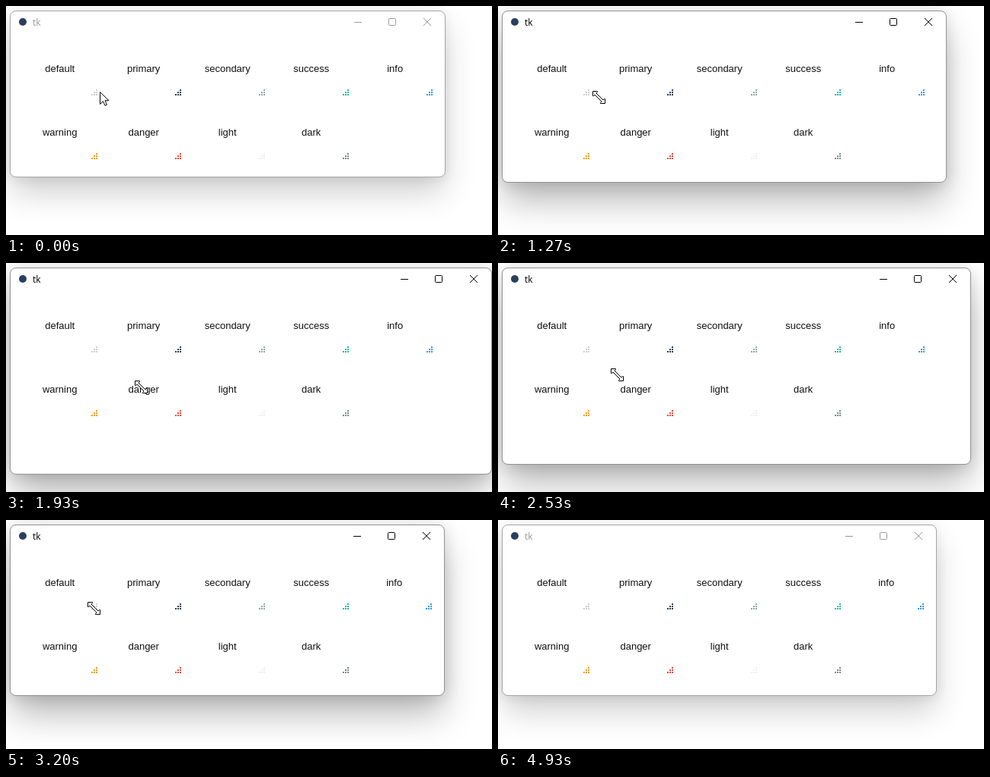
An HTML page that plays this animation: 638x302 px, repeating every 5.07 s.

```html
<!DOCTYPE html>
<html lang="en">
<head>
<meta charset="utf-8">
<title>Size grips</title>
<style>
  html, body { margin: 0; width: 100%; height: 100%; overflow: hidden; background: #fff; }
  #frame {
    position: absolute; left: 5px; top: 6px; box-sizing: border-box;
    background: #fff; border: 1px solid #a6a6a6; border-radius: 8px;
    box-shadow: 0 22px 42px -2px rgba(0,0,0,.19), 0 2px 16px rgba(0,0,0,.09);
  }
  #frame.active {
    border-color: #929292;
    box-shadow: 0 27px 46px -3px rgba(0,0,0,.28), 0 2px 20px rgba(0,0,0,.14);
  }
  svg { position: absolute; left: 0; top: 0; }
  .label { font: 13px "Liberation Sans", Arial, sans-serif; text-anchor: middle; fill: #111; }
  .title { font: 12px "Open Sans", sans-serif; }
  #chrome { color: #999; }
  #chrome.active { color: #000; }
  #buttons { fill: none; stroke: currentColor; }
  .pointer { fill: #fff; stroke: #000; }
</style>
</head>
<body>
<div id="frame"></div>
<svg width="638" height="302" viewBox="0 0 638 302">
  <circle cx="22" cy="21" r="5" fill="#2b3f5c"/>
  <g id="chrome">
    <text class="title" x="35" y="26" fill="currentColor">tk</text>
    <g id="buttons">
      <path d="M-120 21.5h10"/>
      <rect x="-74.5" y="16.5" width="9" height="9" rx="1"/>
      <path d="M-29 16l10 10m0-10l-10 10"/>
    </g>
  </g>
  <g id="cells"></g>
  <path id="arrow" class="pointer" d="M.5 .5V16.5L4.5 12.7 7 18.3 9.5 17.2 7 11.7H12Z"/>
  <path id="resize" class="pointer"
    d="M.5 .5H6.5V1.5L5 3 14 12 15.5 10.5H16.5V16.5H10.5V15.5L12 14 3 5 1.5 6.5H.5Z"/>
</svg>
<script>
const LOOP = 5070, STEP = 1000 / 15;
const FOCUS = 15, RELEASE = 58, GONE = 62, BLUR = 74;
const $ = id => document.getElementById(id);

const styles = {
  default: '#cfcfcf', primary: '#2c3e50', secondary: '#95a5a6',
  success: '#18bc9c', info: '#3498db', warning: '#f39c12',
  danger: '#e74c3c', light: '#ecf0f1', dark: '#7b8a8b'
};

// A triangle of 2px dots: one, two, then three along the bottom.
let grip = '';
for (let row = 0; row < 3; row++)
  for (let i = 0; i <= row; i++)
    grip += `M${118 - 3 * i} ${110 + 3 * row}h2v2h-2z`;

$('cells').innerHTML = Object.entries(styles).map(([name, color], i) =>
  `<g id="${name}" transform="translate(${i % 5 * 110} ${i < 5 ? 0 : 84})">
    <text class="label" x="70.7" y="87">${name}</text>
    <path d="${grip}" fill="${color}"/>
  </g>`).join('');

const progress = (step, start, end) =>
  Math.min(1, Math.max(0, (step - start) / (end - start)));
const smooth = p => p * p * (3 - 2 * p);

// Pixels added to the window: dragged out along a slight curve, then back in.
function growth(step) {
  const out = smooth(progress(step, 15, 29.2));
  const back = smooth(progress(step, 33, 47.7));
  return [61 * out - 62 * back, 53 * out ** 1.2 - 47 * back].map(Math.round);
}

function pointerAt(step) {
  if (step < 12) {
    const p = progress(step, 0, 8);
    return [123 - 7 * p - 21 * Math.sin(Math.PI * p), 113 - 4 * p].map(Math.round);
  }
  if (step >= RELEASE) {
    const p = progress(step, RELEASE - 1, GONE - 1);
    return [115 - 43 * p * p, 116 + 146 * p].map(Math.round);
  }
  // The window trails the pointer slightly while being dragged.
  const [dw, dh] = growth(step + .7);
  return [116 + dw, 110 + dh];
}

function place(el, x, y, visible = true) {
  el.setAttribute('transform', `translate(${x} ${y})`);
  el.style.display = visible ? '' : 'none';
}

function draw(now) {
  const step = Math.floor((now % LOOP + 4) / STEP);
  const active = step >= FOCUS && step < BLUR;
  const [dw, dh] = growth(step);
  const frame = $('frame');
  frame.style.width = 572 + dw + 'px';
  frame.style.height = 220 + dh + 'px';
  frame.classList.toggle('active', active);
  $('chrome').classList.toggle('active', active);
  place($('buttons'), 577 + dw, 0);
  place($('info'), 440 + Math.min(0, dw), 0);

  const [x, y] = pointerAt(step);
  const resizing = step >= 6 && step < RELEASE;
  place($('arrow'), x, y, !resizing && step < GONE);
  place($('resize'), x - 8, y - 8, resizing);
}

function tick() {
  draw(performance.now());
  requestAnimationFrame(tick);
}
tick();
</script>
</body>
</html>
```
